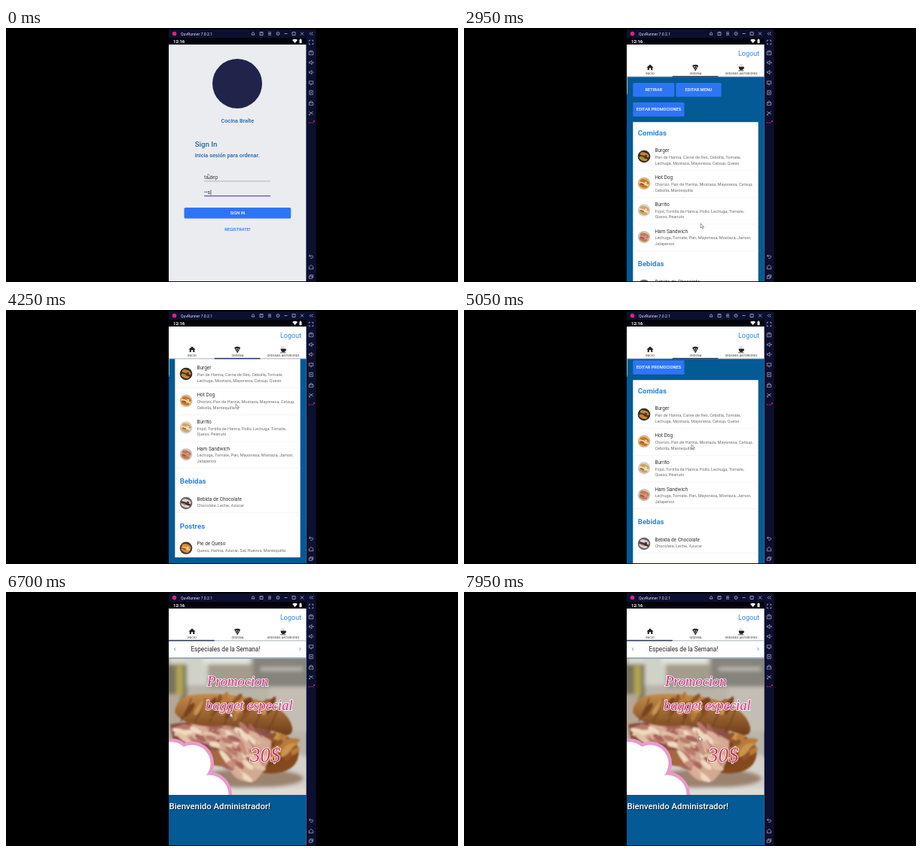
An HTML page that plays this animation: 600x338 px, repeating every 8000 ms.

```html
<!DOCTYPE html>
<html lang="es">
<head>
<meta charset="utf-8">
<style>
  html, body { margin: 0; width: 100%; height: 100%; overflow: hidden; background: #000; }
  svg { display: block; width: 600px; height: 338px; font-family: Roboto, sans-serif; }
  .m { font-weight: 500; }
  .b { font-weight: 700; }
  .mid { text-anchor: middle; }
  .line { fill: none; stroke: #b4b5c6; stroke-width: .8; }
  .script { font: italic 18.5px "Liberation Serif", serif; fill: #c42f82; stroke: #fff; stroke-width: 1.6; paint-order: stroke; }
</style>
</head>
<body>
<svg id="stage" viewBox="0 0 600 338"></svg>
<script>
const LOOP = 8000;
const BLUE = '#2e75f6', LINK = '#2b86dc', TITLE = '#2167a8';
const LEFT = 216, WIDTH = 182.6;

const rect = (x, y, w, h, fill, extra = '') =>
  `<rect x="${x}" y="${y}" width="${w}" height="${h}" fill="${fill}" ${extra}/>`;
const disc = (x, y, r, fill, extra = '') => `<circle cx="${x}" cy="${y}" r="${r}" fill="${fill}" ${extra}/>`;
const oval = (x, y, rx, ry, fill, extra = '') =>
  `<ellipse cx="${x}" cy="${y}" rx="${rx}" ry="${ry}" fill="${fill}" ${extra}/>`;
const shape = (d, fill) => `<path d="${d}" fill="${fill}"/>`;
const text = (x, y, size, fill, str, cls = '', extra = '') =>
  `<text x="${x}" y="${y}" font-size="${size}" fill="${fill}" class="${cls}" ${extra}>${str}</text>`;
const line = (d, extra = '') => `<path class="line" d="${d}" ${extra}/>`;
const button = (x, y, w, h, label) =>
  rect(x, y, w, h, BLUE, 'rx="1.5"') + text(x + w / 2, y + h / 2 + 2, 5.6, '#fff', label, 'm mid');

function emulator() {
  const side = [
    [19, 'M-3-1V-3H-1M1-3H3V-1M3 1V3H1M-1 3H-3V1'],
    [33, 'M-3-2H3V3H-3ZM-2-3H2M-1 0H1'],
    [46, 'M-3-1H-1L1-3V3L-1 1H-3ZM2 0H4M3-1V1'],
    [59, 'M-3-1H-1L1-3V3L-1 1H-3ZM2 0H4'],
    [73, 'M-3-2.5H3V1.5H-3ZM-1 3H1'],
    [86, 'M-2.5-3H2.5V3H-2.5ZM-1 0H1M0-1V1'],
    [100, 'M-3-.5H3V3H-3ZM-2-.5V-2L0-3L2-2V-.5'],
    [113, 'M-3-2L3 2M-3 2L3-2M-3 2V3H-1'],
    [304, 'M-1-2.5L-3-1L-1 1M-3-1H2Q4 2 1 2.5H-1'],
    [318, 'M-3 0L0-3L3 0V3H-3Z'],
    [331, 'M-3-1H1.5V2.5H-3ZM-1.5-1V-2.5H3V1H1.5']
  ];
  const top = [
    [328, 'M-2 1.5H2L1.3 0V-1Q0-3-1.3-1V0Z'], [339, 'M-2-2H2V2H-2ZM0-2V0'],
    [350, 'M-2-1.7H2M-2 0H2M-2 1.7H2'], [361, 'M-2 0A2 2 0 1 0 2 0A2 2 0 1 0-2 0M-.5 0H.5'],
    [371.5, 'M-2 0H2'], [382, 'M-2-2H2V2H-2Z'], [393, 'M-2-2L2 2M-2 2L2-2'],
    [405, 'M0-2L-2 0L0 2M2.5-2L.5 0L2.5 2']
  ];
  return rect(LEFT, 2, 195.5, 336, '#0d0f31') + rect(LEFT, 13, WIDTH, 9.5, '#02030b') +
    disc(223.5, 7.5, 2.8, '#e0246f') + text(232, 9.6, 5.2, '#e4e4ec', 'QuvRunner 7.0.2.1') +
    top.map(([x, d]) => line(d, `transform="translate(${x} 7.5)"`)).join('') +
    side.map(([y, d]) => line(d, `transform="translate(405 ${y}) scale(.9)"`)).join('') +
    [402.5, 405, 407.5].map(x => disc(x, 126, .7, '#d94062')).join('') + disc(409, 124, 1, '#f0304a') +
    text(222, 20, 5.9, '#fff', '12:16', 'b') +
    shape('M380 16Q383.5 13.5 387 16L383.5 20Z', '#fff') +
    rect(389.5, 15.2, 3, 5, '#fff', 'rx=".5"') + rect(390.3, 14.5, 1.4, 1, '#fff');
}

function login() {
  return `<g id="login">` + rect(LEFT, 22, WIDTH, 315, '#ebecf0') +
    disc(307, 74, 33, '#20244a') +
    text(307.3, 126.3, 7.3, TITLE, 'Cocina Bralte', 'm mid') +
    text(250.7, 157.8, 9.7, TITLE, 'Sign In', 'm') +
    text(250.7, 172.4, 7.3, TITLE, 'Inicia sesión para ordenar.', 'm') +
    text(263, 201.4, 6.6, '#444', 'taldep') + rect(263, 203.6, 88, .7, '#9a9aa0') +
    text(263, 221.3, 6.6, '#333', '', '', 'id="password"') +
    rect(0, 215.5, .7, 7, '#333', 'id="caret"') +
    rect(263, 223, 88, .7, '#9a9aa0') + rect(263, 222.9, 88, 1.2, '#5a45dc', 'id="focus"') +
    button(236.5, 239, 141.7, 14.5, '') +
    `<g id="press" clip-path="url(#signin)">` + rect(236, 239, 143, 15, '#fff', 'opacity=".15"') +
    disc(297, 252, 0, '#fff', 'id="ripple" opacity=".26"') + '</g>' +
    text(307.3, 248.2, 5.6, '#fff', 'SIGN IN', 'm mid') +
    text(307.3, 270.4, 5.7, BLUE, 'REGISTRATE!', 'm mid') + '</g>';
}

// Plate colours: background, main food, topping, accent.
const foods = [
  [163, 'Burger', ['Pan de Harina, Carne de Res, Cebolla, Tomate,', 'Lechuga, Mostaza, Mayonesa, Catsup, Queso'], '#33301f', '#c88635', '#5c2a17', '#6f9a3a'],
  [198.8, 'Hot Dog', ['Chorizo, Pan de Harina, Mostaza, Mayonesa, Catsup,', 'Cebolla, Mantequilla'], '#d9b988', '#c9742c', '#f1d7a0', '#b74a2a'],
  [234.5, 'Burrito', ['Frijol, Tortilla de Harina, Pollo, Lechuga, Tomate,', 'Queso, Peanuts'], '#d5d0c8', '#d1a362', '#efe1bd', '#a96548'],
  [270.2, 'Ham Sandwich', ['Lechuga, Tomate, Pan, Mayonesa, Mostaza, Jamon,', 'Jalapenos'], '#cfc6bd', '#bd7f4b', '#dc8d94', '#9e5548'],
  [337.2, 'Bebida de Chocolate', ['Chocolate, Leche, Azucar'], '#6c6467', '#d8d2d0', '#3d2725', '#94665b'],
  [397, 'Pie de Queso', ['Queso, Harina, Azucar, Sal, Huevos, Mantequilla'], '#4b3a2d', '#d98c36', '#f0c477', '#a55024']
];

function foodRow([y, name, details, back, main, topping, accent]) {
  const cy = details.length > 1 ? y + 8 : y + 5.8;
  return disc(239, cy, 8.3, back) +
    `<g transform="rotate(20 239 ${cy})">` + oval(239, cy - 2, 6.2, 3.4, main) + oval(239, cy + 3, 5.8, 2.8, main) +
    oval(239, cy + .5, 6.6, 1.6, topping) + oval(237, cy + 1.8, 3, 1, accent) +
    oval(241, cy - 2, 1.8, .9, topping) + '</g>' +
    text(253.4, y + 2.3, 6.5, '#333', name) +
    details.map((d, i) => text(253.4, y + 11.1 + i * 7.8, 5.6, '#707070', d)).join('');
}

function order() {
  const headings = [[142.7, 'Comidas'], [316.8, 'Bebidas'], [376.5, 'Postres']];
  return `<g id="order"><g id="scroll">` +
    button(224.3, 73, 55, 18.5, 'RETIRAR') + button(281.3, 73, 60.3, 18.5, 'EDITAR MENU') +
    button(224.3, 99, 68.2, 18.7, 'EDITAR PROMOCIONES') +
    rect(224.3, 125.2, 166.3, 290, '#fff') +
    [189.3, 225, 260.7, 296.5, 355.5].map(y => rect(224.3, y, 166.3, .5, '#eaeaea')).join('') +
    headings.map(([y, s]) => text(230.8, y, 9.6, LINK, s, 'b')).join('') +
    foods.map(foodRow).join('') + '</g></g>';
}

let seed = 7;
const random = () => (seed = seed * 16807 % 2147483647) / 2147483647;

// Random overlapping flakes inside an ellipse, all tilted around one angle.
function flakes(count, cx, cy, rx, ry, size, tilt, colors) {
  let out = '';
  for (let i = 0; i < count; i++) {
    const angle = random() * 2 * Math.PI, reach = Math.sqrt(random());
    const x = cx + rx * reach * Math.cos(angle), y = cy + ry * reach * Math.sin(angle);
    out += oval(x, y, size * (.7 + random()), size * .45, colors[i % colors.length],
      `transform="rotate(${tilt + random() * 50 - 25} ${x} ${y})"`);
  }
  return out;
}

function room() {
  return rect(LEFT, 89, WIDTH, 182, '#b9b3a8') + `<g filter="url(#soft)">` +
    rect(206, 80, 34, 72, '#77735c') + rect(226, 98, 9, 40, '#b3a650') + rect(216, 84, 24, 12, '#d9d6c9') +
    rect(240, 80, 28, 44, '#d0d2c8') + rect(268, 96, 62, 32, '#a49c8c') + rect(262, 82, 62, 14, '#e2e2dc') +
    rect(328, 84, 76, 42, '#85837c') + rect(338, 100, 56, 5, '#b9b7ae') +
    rect(350, 126, 54, 60, '#c4bdb3') + rect(206, 136, 26, 60, '#b4a795') +
    oval(310, 246, 120, 40, '#d5d0ca') + oval(325, 248, 70, 13, '#9b8370') + oval(345, 266, 70, 6, '#e0ddd8') + '</g>';
}

function sandwich() {
  const ham = ['#c98f80', '#e3c3a6', '#a8655c', '#dcae9a', '#b97a6c', '#efd9bf'];
  const crust = ['#b87a3b', '#935526', '#cc9450', '#7c431e'];
  let folds = '';
  for (let i = 0; i < 7; i++) {
    const x = 246 + i * 19, y = 141 + i * i * .45;
    folds += `<path d="M${x} ${y}Q${x - 4} ${y + 14} ${x - 14} ${y + 31}" fill="none" stroke="#71401c" stroke-width="2.5" opacity=".6"/>`;
  }
  return `<g filter="url(#blur)">` +
    shape('M222 196Q260 200 300 212L302 234Q262 232 224 212Z', '#a3683a') +
    shape('M322 190Q378 182 388 207Q392 232 366 240Q334 246 322 226Z', '#84491f') +
    flakes(26, 362, 212, 22, 22, 8, -25, crust) +
    shape('M218 176Q260 168 352 182L350 205Q300 222 222 199Z', '#8d5145') +
    flakes(46, 266, 191, 45, 15, 8, 12, ham) +
    shape('M224 160Q226 140 247 137Q288 132 332 143Q373 153 380 180Q381 192 370 190Q330 176 285 178Q238 182 224 160Z', 'url(#crust)') +
    flakes(34, 298, 155, 62, 11, 8, -55, crust) + folds +
    shape('M284 186Q322 178 352 198Q352 232 330 252Q312 256 300 242Q282 216 284 186Z', '#d3a991') +
    flakes(50, 317, 214, 28, 34, 8, 45, ham) + '</g>';
}

function photo() {
  const scallops = [[220, 222, 27], [247, 228, 29], [269, 270, 31], [226, 262, 42]];
  const cloud = (inset, fill) => scallops.map(([x, y, r]) => disc(x, y, r - inset, fill)).join('');
  return `<g id="photo" clip-path="url(#frame)">` + room() + sandwich() +
    cloud(0, '#e79bcc') + cloud(4.5, '#fff') +
    '<text class="script" x="267" y="125">Promocion</text>' +
    '<text class="script" x="265" y="157">bagget especial</text>' +
    '<text class="script" x="324" y="226" style="font-size:27px;fill:#c23a5c">30$</text></g>';
}

function home() {
  const welcome = (dx, fill) => text(216.5 + dx, 289 + dx, 11.35, fill, 'Bienvenido Administrador!', 'm');
  const chevron = d => `<path d="${d}" fill="none" stroke="${LINK}" stroke-width=".8"/>`;
  return `<g id="home">` + rect(LEFT, 65, WIDTH, 22.5, '#fff') + rect(LEFT, 87.5, WIDTH, 1.5, '#9daab7') +
    chevron('M225.2 74L223.2 76L225.2 78') + chevron('M389.4 74L391.4 76L389.4 78') +
    text(245.5, 78.7, 8.15, '#222', 'Especiales de la Semana!') + photo() +
    `<g id="welcome">` + welcome(1, '#082238') + welcome(0, '#fff') + '</g></g>';
}

function header() {
  const label = (x, s) => text(x, 61.6, 4.1, '#444', s, 'mid');
  return rect(LEFT, 22, WIDTH, 43, '#fff') + text(364, 37, 9, LINK, 'Logout') +
    shape('M242.5 52.5L247 48.5L251.5 52.5H250.3V56H248.2V53.3H245.8V56H243.7V52.5Z', '#222') +
    shape('M303 50Q307 47.5 311.2 50L307.2 57.5Z', '#222') +
    disc(306, 51.7, .8, '#fff') + disc(308.4, 52, .7, '#fff') + disc(307, 54.2, .6, '#fff') +
    shape('M364.5 51.5H371Q373 53 371 54.5Q370 56 368 56Q365 56 364.5 51.5ZM364 56.6H371.5V57.3H364ZM366.5 50.5Q366 49 367.5 48.3M368.5 50.5Q368 49 369.5 48.3', '#222') +
    label(247, 'INICIO') + label(307.4, 'ORDENA') + label(368, 'ORDENES ANTERIORES') +
    rect(LEFT, 64.3, WIDTH, 1, '#a9b2bc') + rect(LEFT, 63.8, 60.7, 1.5, '#283a5a', 'id="indicator"');
}

const stage = document.getElementById('stage');
stage.innerHTML = `<defs>
  <clipPath id="phone">${rect(LEFT, 22, WIDTH, 315)}</clipPath>
  <clipPath id="frame">${rect(LEFT, 89, WIDTH, 181)}</clipPath>
  <clipPath id="signin">${rect(236.5, 239, 141.7, 14.5, '', 'rx="1.5"')}</clipPath>
  <linearGradient id="crust" x2="0" y2="1"><stop stop-color="#c48c4a"/><stop offset="1" stop-color="#6f3d1a"/></linearGradient>
  <filter id="soft"><feGaussianBlur stdDeviation="2.5"/></filter>
  <filter id="blur"><feGaussianBlur stdDeviation=".8"/></filter>
</defs>` + emulator() + `<g clip-path="url(#phone)">` + login() +
  `<g id="app">` + rect(LEFT, 22, WIDTH, 315, '#035a95') + order() + home() + header() + '</g></g>' +
  '<path id="cursor" d="M0 0V6.2L1.5 4.9L2.6 7.2L3.7 6.7L2.6 4.5H4.6Z" fill="#f4f4f4" stroke="#666" stroke-width=".6"/>';

const el = {};
stage.querySelectorAll('[id]').forEach(node => el[node.id] = node);

const ease = p => p * p * (3 - 2 * p);
const progress = (t, from, to) => ease(Math.min(1, Math.max(0, (t - from) / (to - from))));
const show = (node, on) => node.setAttribute('display', on ? 'inline' : 'none');
const move = (node, x, y) => node.setAttribute('transform', `translate(${x} ${y})`);

const pointer = [
  [0, 268, 194], [900, 268, 194], [1650, 295, 251], [2500, 295, 251], [2900, 314, 260],
  [3150, 314, 260], [3800, 305, 125], [4500, 305, 125], [4950, 302, 179], [5150, 302, 179],
  [5650, 247, 52], [6250, 247, 52], [6900, 312, 192], [8000, 312, 192]
];

function pointerAt(t) {
  const i = pointer.findIndex(([time]) => time > t);
  const [t0, x0, y0] = pointer[i - 1], [t1, x1, y1] = pointer[i];
  const p = progress(t, t0, t1);
  return [x0 + (x1 - x0) * p, y0 + (y1 - y0) * p];
}

function render(t) {
  const typed = Math.min(8, 3 + Math.floor(t / 160));
  const hidden = t < 1200 ? typed - 1 : typed;
  el.password.textContent = '•'.repeat(hidden) + (hidden < typed ? 'sanelo'[typed - 3] : '');
  const focused = t < 1750;
  el.caret.setAttribute('x', 263.5 + hidden * 2.3 + (typed - hidden) * 3.5);
  show(el.caret, focused && (t < 1000 || t % 1000 < 500));
  show(el.focus, focused);
  show(el.press, t >= 1780 && t < 2150);
  el.ripple.setAttribute('r', Math.max(0, (t - 1780) * .54));

  const entered = progress(t, 2350, 2550);
  show(el.app, entered > 0);
  el.app.setAttribute('opacity', entered);

  const slide = progress(t, 5750, 6050);
  const scroll = 86 * progress(t, 3200, 3850) - 54 * progress(t, 4500, 5000);
  move(el.scroll, 0, -scroll);
  move(el.order, 182 * slide, 0);
  move(el.home, 182 * (slide - 1), 0);
  move(el.indicator, 60.7 * (1 - slide), 0);

  const loaded = t >= 6250;
  show(el.photo, loaded);
  move(el.welcome, 0, loaded ? 0 : -184);
  move(el.cursor, ...pointerAt(t));
}

function tick() {
  render(performance.now() % LOOP);
  requestAnimationFrame(tick);
}
tick();
</script>
</body>
</html>
```
